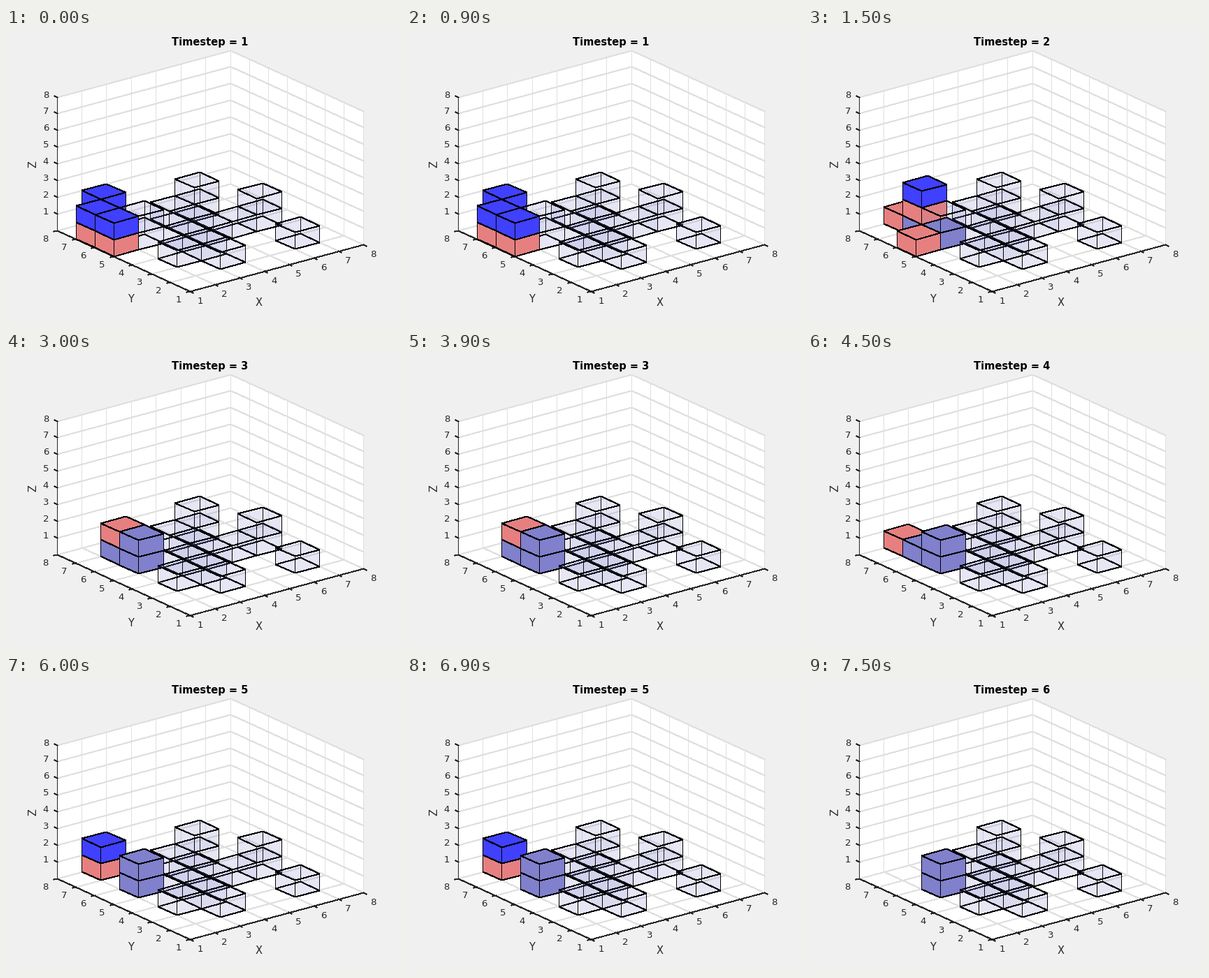
Write a matplotlib script that moves like this. It is 565 px wide and 424 px high and loops after 8 s.

```python
import numpy as np
import matplotlib.pyplot as plt
from matplotlib.animation import FuncAnimation
from matplotlib.collections import PolyCollection

W, H, DPI = 565, 424, 100
PX = 72 / DPI
INK = "#262626"
GRID = "#dfdfdf"
FRAME_MS, HOLD = 500, 3
FRAMES = 8000 // FRAME_MS

COLORS = {"B": (0.25, 0.25, 1, 1), "R": (0.9, 0.5, 0.5, 1),
          "H": (0.5, 0.5, 0.8, 1), "ghost": (0.5, 0.5, 0.8, 0.1)}

# Screen position of the near corner and of one unit along each axis
ORIGIN = np.array([263, 377])
AXES = np.array([[248 / 7, -67 / 7], [-190 / 7, -87 / 7], [0, -191 / 8]])

# Height of the ghost stack on each floor cell: rows along Y, columns along X
PLAN = [".1..1", "11...", ".1112", "2.1..", "..12."]
GOAL = {(x, y, z): "ghost"
        for y, row in enumerate(PLAN, 1) for x, n in enumerate(row, 1)
        if n != "." for z in range(int(n))}

# Colours of the stack on each spot, bottom to top, one line per timestep
SPOTS = [(0, 4), (0, 5), (1, 6), (1, 5), (1, 4)]
STEPS = ["RB RB RB . .",
         "R . R HRB H",
         ". . . HR HH",
         ". . R H HH",
         ". . RB . HH",
         ". . . . HH"]

SQUARE = [(0, 0), (1, 0), (1, 1), (0, 1)]


def face(axis, side):
    return np.insert(SQUARE, axis, side, axis=1)


BACK = [face(0, 1), face(1, 1), face(2, 0)]
FRONT = [face(0, 0), face(1, 0), face(2, 1)]


def project(points):
    return np.floor(ORIGIN + np.asarray(points) @ AXES + 1e-6)


fig = plt.figure(figsize=(W / DPI, H / DPI), dpi=DPI, facecolor="#f0f0f0")
ax = fig.add_axes([0, 0, 1, 1])
ax.set_xlim(-0.5, W - 0.5)
ax.set_ylim(H - 0.5, -0.5)
ax.axis("off")


def stroke(points, color=INK):
    x, y = np.transpose(points)
    ax.plot(x, y, color=color, lw=0.96 * PX, antialiased=False, zorder=2)


def label(x, y, text, size, **style):
    style = {"color": INK, "ha": "center", "va": "baseline", **style}
    return ax.text(x, y, text, fontsize=size * PX,
                   family="DejaVu Sans", **style)


def tick(point, out, shift, text):
    base = project(point)
    stroke([base, base + out])
    x, y = base + shift
    label(x, y + 4.5, text, 13.33)


def draw_axes():
    walls = [project(f * (7, 7, 8)) for f in BACK]
    ax.add_collection(PolyCollection(walls, facecolors="white",
                                     edgecolors="none", zorder=1))
    for i in range(8):
        for path in ([(i, 0, 0), (i, 7, 0), (i, 7, 8)],
                     [(0, i, 0), (7, i, 0), (7, i, 8)],
                     [(0, 7, i + 1), (7, 7, i + 1), (7, 0, i + 1)]):
            stroke(project(path), GRID)
    stroke(project([(0, 7, 8), (0, 7, 0), (0, 0, 0), (7, 0, 0)]))
    for i in range(8):
        name = str(i + 1)
        tick((i, 0, 0), (4, 2), (14, 13), name)
        tick((0, i, 0), (-5, 1), (-17, 11), name)
        tick((0, 7, i + 1), (-4, -2), (-16.5, -4), name)
    label(361.5, 397.5, "X", 14.67)
    label(178, 392.5, "Y", 14.67)
    label(38.5, 194, "Z", 14.67, rotation=90, va="center")


draw_axes()
title = label(291.5, 24.5, "", 14.67, color="black", weight="bold")
cubes = PolyCollection([], edgecolors="black", linewidths=0.96 * PX,
                       antialiaseds=False, zorder=4)
ax.add_collection(cubes)


def stacks(step):
    return {(x, y, z): kind
            for (x, y), stack in zip(SPOTS, STEPS[step].split())
            for z, kind in enumerate(stack.strip("."))}


def update(frame):
    step = frame // HOLD
    cells = {**GOAL, **stacks(step)}
    polys, colors, seen = [], [], set()
    # Paint from far to near; a face shared by two cubes is painted once
    for cell in sorted(cells, key=lambda c: c[2] - c[0] - c[1]):
        kind = cells[cell]
        for side in (BACK + FRONT if kind == "ghost" else FRONT):
            corners = side + np.array(cell)
            center = tuple(corners.mean(axis=0))
            if center not in seen:
                seen.add(center)
                polys.append(project(corners))
                colors.append(COLORS[kind])
    cubes.set_verts(polys)
    cubes.set_facecolor(colors)
    title.set_text(f"Timestep = {step + 1}")
    return cubes, title


anim = FuncAnimation(fig, update, frames=FRAMES, interval=FRAME_MS,
                     init_func=lambda: update(0), repeat=True, repeat_delay=0)
plt.show()
```
